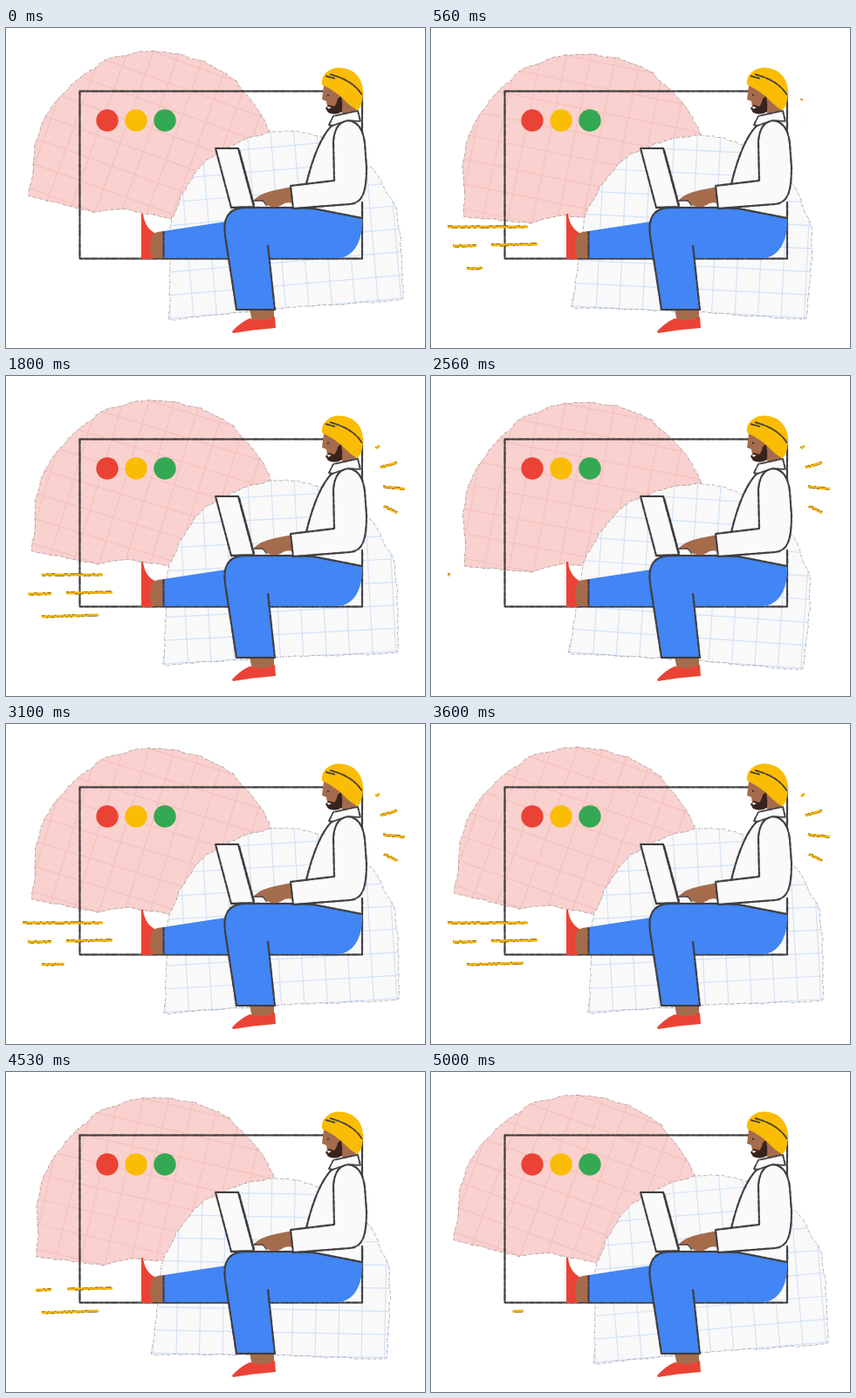
Write an HTML page with a canvas that moves like this. It is 480 by 367 pixels and loops after 5.03 s.

```html
<!DOCTYPE html>
<html lang="en">
<head>
<meta charset="utf-8">
<title>Working in a window</title>
<style>
html, body { margin: 0; width: 100%; height: 100%; overflow: hidden; background: #fff; }
canvas { display: block; width: 480px; height: 367px; }
</style>
</head>
<body>
<canvas id="stage" width="480" height="367"></canvas>
<script>
const ctx = document.getElementById('stage').getContext('2d');
const LOOP = 5030, HALF = LOOP / 2, RAD = Math.PI / 180;
const INK = '#3f3d3f', BLUE = '#4285f4', RED = '#ea4335', YELLOW = '#fbbc04',
      GREEN = '#34a853', SKIN = '#a56c4c', CLOTH = '#fafafa';

const clamp = v => Math.max(0, Math.min(1, v));

function seeded(n) {
  return () => (n = (n * 16807) % 2147483647) / 2147483647;
}

// Half an ellipse closed by a few base points, its edge torn at random
function dome(cx, cy, rx, ry, base, seed) {
  const rnd = seeded(seed), path = new Path2D(), pts = [];
  for (let a = 180; a <= 360; a += 6) {
    const r = 1 + (rnd() - .5) * .025;
    pts.push([cx + rx * r * Math.cos(a * RAD), cy + ry * r * Math.sin(a * RAD)]);
  }
  pts.push(...base);
  pts.forEach(([x, y], i) => {
    const [u, v] = pts[(i + 1) % pts.length];
    const n = Math.ceil(Math.hypot(u - x, v - y) / 6);
    for (let k = 0; k < n; k++) {
      path.lineTo(x + (u - x) * k / n + (rnd() - .5) * 1.8,
                  y + (v - y) * k / n + (rnd() - .5) * 1.8);
    }
  });
  path.closePath();
  return path;
}

const pink = {
  path: dome(170, 165, 140, 138, [[195, 220], [131, 207], [100, 211], [25, 193]], 71),
  x: 193, y: 125, swing: -9.4, lows: [0, 1415, 3490, LOOP],
  fill: '#f9d1ce', line: '#f5c1bc', gap: 28, tilt: 20
};
const white = {
  path: dome(320, 251, 133, 133, [[455, 312], [320, 321], [187, 335]], 29),
  x: 278, y: 139, swing: 9.4, lows: [0, 1525, 3350, LOOP],
  fill: '#f9f9f9', line: '#d3e2f7', gap: 26.5, tilt: -5
};

// Swings away from rest and back between successive low points
function sway(t, lows) {
  const i = lows.findIndex(low => low > t) - 1;
  const p = (t - lows[i]) / (lows[i + 1] - lows[i]);
  return (1 - Math.cos(p * 2 * Math.PI)) / 2;
}

function paper(s, t) {
  ctx.save();
  ctx.translate(s.x, s.y);
  ctx.rotate(s.swing * sway(t, s.lows) * RAD);
  ctx.translate(-s.x, -s.y);
  ctx.fillStyle = s.fill;
  ctx.fill(s.path);
  ctx.save();
  ctx.clip(s.path);
  ctx.translate(s.x, s.y);
  ctx.rotate(s.tilt * RAD);
  ctx.beginPath();
  for (let d = -12 * s.gap; d < 330; d += s.gap) {
    ctx.moveTo(d, -330); ctx.lineTo(d, 330);
    ctx.moveTo(-330, d); ctx.lineTo(330, d);
  }
  ctx.strokeStyle = s.line;
  ctx.lineWidth = 1.2;
  ctx.stroke();
  ctx.restore();
  ctx.setLineDash([3, 1, 1, 2]);
  ctx.strokeStyle = 'rgba(50,45,45,.55)';
  ctx.lineWidth = .7;
  ctx.stroke(s.path);
  ctx.restore();
}

function fill(d, color) {
  ctx.fillStyle = color;
  ctx.fill(new Path2D(d));
}

// Pencil stroke: a solid core with a faint, grainy edge
function pencil(d, w = 1.9) {
  const p = new Path2D(d);
  ctx.strokeStyle = INK;
  ctx.lineWidth = w;
  ctx.stroke(p);
  ctx.save();
  ctx.globalAlpha = .4;
  ctx.setLineDash([5, 3, 2, 4, 7, 2]);
  ctx.lineWidth = w + .8;
  ctx.stroke(p);
  ctx.restore();
}

function outlined(d, color, w) {
  fill(d, color);
  pencil(d, w);
}

function dot(x, y, r, color) {
  ctx.fillStyle = color;
  ctx.beginPath();
  ctx.arc(x, y, r, 0, 2 * Math.PI);
  ctx.fill();
}

function drawWindow() {
  pencil('M84.5 72.5H408V264.5H84.5Z');
  [RED, YELLOW, GREEN].forEach((c, i) => dot(116 + 33 * i, 106, 12.7, c));
}

function drawLegs() {
  // far leg
  fill('M155 213H157Q159 230 172 236L168 265H155Z', RED);
  fill('M168 236Q174 233 181 233V264H167Q163 249 168 236Z', SKIN);
  fill('M180 233L252 222L262 264H180Z', BLUE);
  pencil('M180.5 233V264', 1.7);
  // near leg
  fill('M279 322H307V337H282Z', SKIN);
  fill('M259 348Q268 338 279 333Q294 338 308 331L309 344Q282 346 260 350Z', RED);
  fill('M274 205L352 206L408 218C409 246 398 264 378 264H302L308 323H264L251 238C248 217 256 205 274 205Z', BLUE);
  pencil('M180 264.5H255M302 264.5H380', 1.2);
  pencil('M352 206H274C256 206 248 217 251 238L264 323H308L300 249');
}

function drawLaptop() {
  outlined('M240 138H266L284 205L258 206Z', CLOTH);
  pencil('M267 140L284 203M257 206H330');
}

function drawHand() {
  fill('M283 198Q292 189 308 186L328 182V201Q320 199 316 203Q309 207 301 204L294 199Z', SKIN);
  pencil('M284 198H294L299 204', 1.1);
}

function drawHead() {
  fill('M383 78L401 86V96L385 99Z', SKIN);
  fill('M364 66L384 72L391 89L381 95L368 91L367 84L362 82Z', SKIN);
  fill('M366 92L370 88L376 90Q379 87 380 81L384 78Q386 87 385 96Q377 101 369 97Z', '#38231c');
  fill('M368 90L373 91L369 93Z', '#fff');
  dot(369, 77, 1.2, INK);
  fill('M362 65Q361 56 367 51Q375 44 387 46C402 49 410 61 409 76Q408 89 403 94Q397 92 389 84Q379 73 362 65Z', YELLOW);
  pencil('M366 55L377 58M371 53Q398 60 408 77', 1.4);
}

function drawJacket() {
  fill('M374 111Q356 129 344 179L328 206H352L408 218L413 160L402 104Z', CLOTH);
  pencil('M374 111Q356 129 344 179M328 206L352 207L408 218V199');
  outlined('M376 175L375 130Q377 108 391 106Q408 107 411 132L413 160C413 187 409 201 394 202L329 207L326 181Z', CLOTH);
  outlined('M370 111L375 101L403 95L406 107L391 106L374 112Z', CLOTH, 1.6);
}

// A line drawn from its tail and later wiped the same way
function streak(x, y, len, angle, grown, wiped) {
  const head = clamp(grown) ** 2 * len, tail = clamp(wiped) ** 3 * len;
  if (head - tail < .1) return;
  ctx.save();
  ctx.translate(x, y);
  ctx.rotate(angle);
  ctx.fillStyle = '#f3b40a';
  ctx.fillRect(tail, -1.5, head - tail, 3);
  ctx.fillStyle = '#80610f';
  const rnd = seeded(Math.round(x * y));
  for (let s = 0; s < len; s += 2.5) {
    const side = rnd() < .5 ? -1.7 : .8, w = 1 + rnd() * 2;
    if (s >= tail && s + w <= head) ctx.fillRect(s, side, w, .9);
  }
  ctx.restore();
}

function drawTrails(t) {
  [[19, 228, 92], [25, 250, 27], [69, 249, 53], [41, 276, 65]].forEach(([x, y, len], i) =>
    streak(x, y, len, -.01 * i, (t - 143 * i) / 250, (t - 1530 - 183 * i) / 437));
}

function drawSparks(t) {
  [5, 20, 25, 17].forEach((len, i) =>
    streak(433 - (3 - i) ** 2, 83 + 22 * i, len, -.68 + .39 * i,
           (t - 420 - 115 * i) / 220, (t - 3590 - 175 * i) / 240));
}

function draw(t) {
  ctx.fillStyle = '#fff';
  ctx.fillRect(0, 0, 480, 367);
  ctx.lineJoin = 'round';
  paper(pink, t);
  paper(white, t);
  drawWindow();
  drawLegs();
  drawLaptop();
  drawHand();
  drawHead();
  drawJacket();
  drawTrails(t % HALF);
  drawSparks(t);
}

const start = performance.now();
function tick() {
  draw((performance.now() - start) % LOOP);
  requestAnimationFrame(tick);
}
tick();
</script>
</body>
</html>
```
